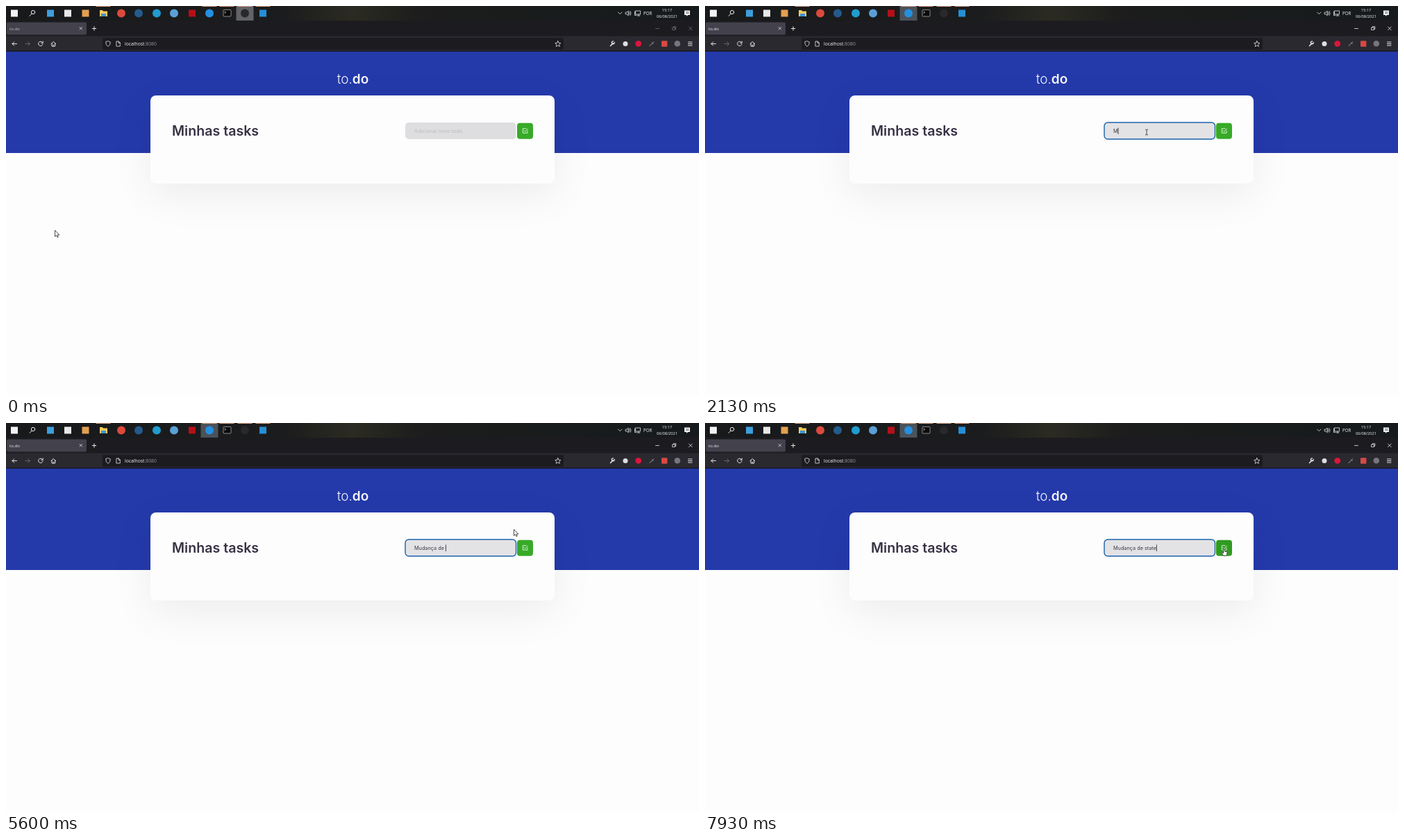
An HTML page that plays this animation: 998 px wide and 561 px high, repeating every 8000 ms.

```html
<!DOCTYPE html>
<html lang="pt">
<head>
<meta charset="utf-8">
<title>to.do</title>
<style>
  html, body { margin: 0; width: 100%; height: 100%; overflow: hidden; background: #fdfdfe; }
  .banner { position: absolute; left: 0; top: 65px; width: 998px; height: 147px; background: #243aab; }
  .card { position: absolute; left: 208px; top: 129px; width: 582px; height: 127px; border-radius: 8px;
          background: #fdfdfe; box-shadow: 0 16px 60px rgba(0, 0, 20, .07); }
  svg { position: absolute; left: 0; top: 0; }
  text { font-family: "Open Sans", "Noto Sans", sans-serif; fill: #f4f4f6; }
  .page text { font-family: Inter, sans-serif; white-space: pre; }
  .line { fill: none; stroke: #e6e6ea; stroke-width: 1; stroke-linecap: round; stroke-linejoin: round; }
  .thin { stroke-width: .8; }
</style>
</head>
<body>
<div class="banner"></div>
<div class="card"></div>
<svg width="998" height="561" viewBox="0 0 998 561">
  <defs>
    <linearGradient id="bar">
      <stop offset="0" stop-color="#18191b"/>
      <stop offset=".4" stop-color="#1b1c1d"/>
      <stop offset=".5" stop-color="#2b2b22"/>
      <stop offset=".6" stop-color="#1c1d1c"/>
      <stop offset="1" stop-color="#161a1c"/>
    </linearGradient>
  </defs>

  <!-- Taskbar -->
  <rect width="998" height="21" fill="url(#bar)"/>
  <rect id="taskHighlight" y="0" width="25" height="21"/>
  <g id="taskbar"></g>
  <g class="line">
    <circle cx="39" cy="9" r="2.7"/>
    <path d="M37 11.200l-3 3.200"/>
  </g>
  <path d="M135 6h4l1 1.500h6v7.500h-11z" fill="#f3cb5c"/>
  <path d="M137 11h7v4h-7z" fill="#3d94d4"/>
  <rect x="313" y="5.500" width="11" height="9.500" rx="1" fill="#0b0b0c" stroke="#aaa" stroke-width=".8"/>
  <path class="line thin" d="M315 8l1.500 1.200-1.500 1.200"/>
  <g class="line thin">
    <path d="M881.500 9l2.700 2.700L887 9"/>
    <path d="M892.500 9.200h1.500l2.200-2v6.600l-2.200-2h-1.500zM897.500 8.800q1.300 1.700 0 3.400M899 7.500q2.300 3 0 6"/>
    <path d="M907 7h6.500v5H907zM909 14h4M911 12v2M905.500 8v5.500h2"/>
  </g>
  <path d="M977 6.500h8v6.500h-3l-2 2v-2h-3z" fill="#f2f2f2"/>
  <path d="M979 8.700h4.500M979 10.500h4.500" stroke="#444" stroke-width=".7"/>
  <text x="918" y="12.700" font-size="6.200">POR</text>
  <text x="952" y="8" font-size="5.600" text-anchor="middle">15:17</text>
  <text x="952" y="17" font-size="5.700" text-anchor="middle">06/08/2021</text>

  <!-- Browser -->
  <rect y="21" width="998" height="23" fill="#1c1c20"/>
  <rect x="1" y="23.500" width="115" height="18" rx="2" fill="#42414c"/>
  <rect y="43.500" width="998" height="22" fill="#2a2930"/>
  <rect y="64.500" width="998" height="1" fill="#0e0e12"/>
  <rect x="139" y="46" width="664" height="17" rx="2" fill="#1b1b20"/>
  <text id="tabTitle" x="5" y="35" font-size="6.100">to.do</text>
  <path class="line thin" d="M106 30.500l3.500 3.500m0-3.500l-3.500 3.500"/>
  <path class="line" d="M124.300 32.500h5.400M127 29.800v5.400"/>
  <g id="windowControls" class="line thin">
    <path d="M935.500 32.500h5M960 31h3.500v3.500H960zM961.300 31v-1.300h3.500v3.500h-1.300M983.500 30l4.700 4.700m0-4.700l-4.700 4.700"/>
  </g>
  <g class="line">
    <path d="M15.500 54.500H9m2.700-2.700L9 54.500l2.700 2.700"/>
    <path d="M28 54.500h6.500m-2.700-2.700l2.700 2.700-2.700 2.700" stroke="#66656c"/>
    <path d="M52.500 52.500a3.200 3.200 0 1 0 .5 2.500M53.200 51v2.300h-2.400"/>
    <path d="M65 54.500l3.300-3 3.300 3M66 54v4h4.700v-4M68.300 58v-2"/>
    <path class="thin" d="M147 50.700l3.300 1.300q.2 4.500-3.300 6.500-3.500-2-3.300-6.500z"/>
    <path class="thin" d="M159.300 51h3l2 2v5h-5zM162 51v2.300h2.300"/>
    <path class="thin" d="M794.800 50.500l1.200 2.700 2.900.300-2.200 2 .6 2.900-2.500-1.500-2.500 1.500.6-2.900-2.200-2 2.900-.300z"/>
    <path d="M870.500 57.500l3.700-3.700" stroke-width="1.600"/>
    <path d="M876.300 52.500a2 2 0 1 1-1.700-1.700" stroke-width="1.300"/>
    <path d="M927 57.500l3-3m.5-1.500l1.500 1.500M931 53.500l1.700-1.700" stroke="#a9a9b0"/>
    <path d="M982.500 52h5.500M982.500 54.500h5.500M982.500 57h5.500"/>
  </g>
  <circle cx="892" cy="54.500" r="3.500" fill="#dedee2"/>
  <circle cx="910.700" cy="54.300" r="4.400" fill="#d8173c"/>
  <rect x="944" y="50.300" width="8.400" height="8.400" rx="1" fill="#d64a43"/>
  <circle cx="966.800" cy="54.300" r="4.300" fill="#77767d"/>
  <text x="171" y="57" font-size="6.800">localhost<tspan fill="#96959c">:8080</tspan></text>

  <!-- Page -->
  <g class="page">
    <text x="499.500" y="112" font-size="19" font-weight="300" text-anchor="middle">to.<tspan font-weight="600">do</tspan></text>
    <text x="239" y="187" font-size="19.600" font-weight="600" style="fill:#383245">Minhas tasks</text>
    <rect id="field" x="575" y="168" width="159.500" height="24" rx="5"/>
    <text id="fieldText" x="588" y="182.600" font-size="7.300"></text>
    <rect id="caret" y="175.500" width=".9" height="9.500" fill="#333"/>
    <rect id="button" x="736" y="168.700" width="23" height="23" rx="4"/>
    <path class="line thin" d="M751 180v3.200h-6.700v-6.500h4.700M746 179.600l1.700 1.700 3.700-4.200" style="stroke:#fff"/>
  </g>

  <!-- Pointers, each with its hotspot at 0,0 -->
  <g id="pointer" stroke="#222" stroke-width=".8" stroke-linejoin="round">
    <path id="arrow" fill="#fff" d="M.5.500v9l2-1.900 1.400 3 1.400-.6-1.300-2.900h2.800z"/>
    <path id="beam" fill="none" d="M-2-3.800h1.500l.5.500.5-.5H2M0-3.500v7M-2 3.800h1.500l.5-.5.5.500H2"/>
    <path id="hand" fill="#fff" d="M-.9.500q.9-1 1.700 0v3l3 .6q.9.300.8 1.300l-.6 2.800-.7 1.800h-4L-3 6.600q-.8-1.200 0-1.500.7-.2 2.100 1.300z"/>
  </g>
</svg>

<script>
const DURATION = 8000;
const FOCUS_TIME = 1300;
const MESSAGE = "Mudança de state";
const KEY_TIMES = [2050, 2350, 2600, 2850, 3100, 3500, 3700, 3950, 4500, 4750, 5200, 5800, 6000, 6250, 6450, 6650];
const POINTER_PATH = [ // time, x, y
  [0, 70, 323], [200, 70, 323], [700, 600, 197], [1050, 636, 182], [5050, 636, 182],
  [5500, 731, 153], [6500, 731, 153], [6900, 774, 149], [7080, 774, 149],
  [7370, 768, 316], [7450, 764, 316], [7800, 747.5, 181.5], [DURATION, 747.5, 181.5]
];
const APP_ICONS = [ // centre x, shape, colour
  [12, "square", "#f2f2f2"], [64, "square", "#3d9fdc"], [89, "square", "#e8e8e8"], [114.5, "square", "#e3a050"],
  [166, "circle", "#dc4a3c"], [191, "circle", "#245a8c"], [217, "circle", "#209ccf"], [242, "circle", "#5b9fd6"],
  [268, "square", "#b51019"], [293, "circle", "#258fe0"], [344, "circle", "#29282b"], [370, "square", "#258fd6"]
];
const RUNNING_APPS = [140, 293, 318, 344, 370];

const $ = id => document.getElementById(id);
const set = (id, attributes) => {
  for (const name in attributes) $(id).setAttribute(name, attributes[name]);
};
const show = (id, visible) => set(id, { visibility: visible ? "visible" : "hidden" });
const inside = ([x, y], left, top, right, bottom) => x >= left && x <= right && y >= top && y <= bottom;

$("taskbar").innerHTML =
  APP_ICONS.map(([x, shape, color]) => shape === "circle"
    ? `<circle cx="${x}" cy="10.5" r="6" fill="${color}"/>`
    : `<rect x="${x - 5}" y="5.500" width="10" height="10" fill="${color}"/>`).join("") +
  RUNNING_APPS.map(x => `<rect x="${x - 10.5}" width="21" height="1" fill="#dda184"/>`).join("");

function pointerAt(time) {
  const next = Math.max(1, POINTER_PATH.findIndex(point => point[0] > time));
  const [t0, x0, y0] = POINTER_PATH[next - 1];
  const [t1, x1, y1] = POINTER_PATH[next];
  const p = (time - t0) / (t1 - t0);
  const eased = p * p * (3 - 2 * p);
  return [x0 + (x1 - x0) * eased, y0 + (y1 - y0) * eased];
}

function drawWindow(focused) {
  set("taskHighlight", { x: focused ? 280.5 : 331.5, fill: focused ? "#4b525a" : "#626366" });
  set("tabTitle", { opacity: focused ? 1 : .7 });
  set("windowControls", { opacity: focused ? 1 : .4 });
  set("field", {
    fill: focused ? "#e3e3e5" : "#dedee0",
    stroke: focused ? "#1c62ad" : "#dedee0",
    "stroke-width": focused ? 1.4 : 0
  });
}

function drawField(time, focused) {
  const typed = KEY_TIMES.filter(key => key <= time).length;
  $("fieldText").textContent = typed ? MESSAGE.slice(0, typed) : "Adicionar novo todo";
  $("fieldText").style.fill = typed ? "#3c3848" : "#bcbbc3";
  const lastInput = typed ? KEY_TIMES[typed - 1] : FOCUS_TIME;
  set("caret", { x: 588 + (typed ? $("fieldText").getComputedTextLength() : 0) });
  show("caret", focused && (time - lastInput) % 1000 < 500);
}

function drawPointer(time) {
  const position = pointerAt(time);
  const overField = inside(position, 575, 168, 734, 192);
  const overButton = inside(position, 736, 168, 759, 192);
  set("pointer", { transform: `translate(${position})` });
  set("button", { fill: overButton ? "#2f9c21" : "#37aa27" });
  show("beam", overField);
  show("hand", overButton);
  show("arrow", !overField && !overButton);
}

function render() {
  const time = performance.now() % DURATION;
  const focused = time >= FOCUS_TIME;
  drawWindow(focused);
  drawField(time, focused);
  drawPointer(time);
  requestAnimationFrame(render);
}
render();
</script>
</body>
</html>
```
